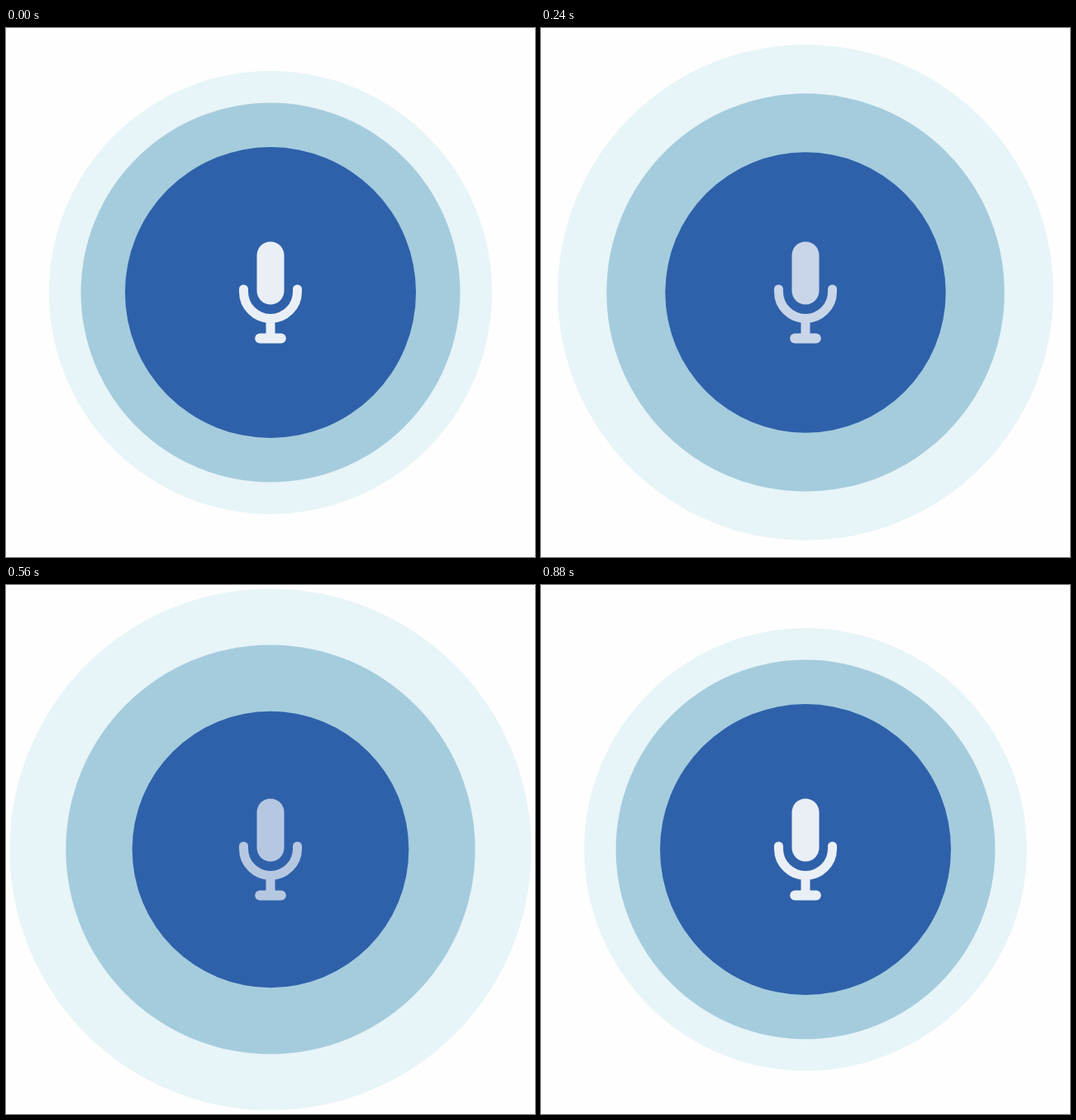
An HTML page for the animation above (960 ms loop, 640 by 640 pixels).

```html
<!DOCTYPE html>
<html lang="en">
<head>
<meta charset="utf-8">
<title>Voice input pulse</title>
<style>
  html, body { margin: 0; width: 100%; height: 100%; overflow: hidden; background: #fefefe; }
  svg { display: block; width: 640px; height: 640px; animation: pulse .96s step-end infinite; }
  .halo { fill: #e7f4f8; r: var(--halo); }
  .ring { fill: #a5ccdd; r: var(--ring); }
  .disc { fill: #2e61aa; r: var(--disc); }
  .mic { fill: #fff; opacity: var(--ink); }
  .cradle { fill: none; stroke: #fff; stroke-width: 11; stroke-linecap: round; }

  /* quick swell, long hold, quick release, held in 80 ms ticks */
  @keyframes pulse {
    0%       { --halo: 268px;   --ring: 229.4px; --disc: 176px;   --ink: .9; }
    8.3333%  { --halo: 271px;   --ring: 230.2px; --disc: 175.2px; --ink: .885; }
    16.6667% { --halo: 280.7px; --ring: 233.2px; --disc: 173px;   --ink: .835; }
    25%      { --halo: 299.8px; --ring: 240.7px; --disc: 169.7px; --ink: .74; }
    33.3333% { --halo: 309.5px; --ring: 244.8px; --disc: 168.2px; --ink: .685; }
    41.6667% { --halo: 314.2px; --ring: 247px;   --disc: 167.4px; --ink: .66; }
    50%      { --halo: 316px;   --ring: 247.8px; --disc: 167.2px; --ink: .65; }
    58.3333% { --halo: 315.6px; --ring: 247.6px; --disc: 167.3px; --ink: .65; }
    66.6667% { --halo: 312.5px; --ring: 246.2px; --disc: 167.8px; --ink: .67; }
    75%      { --halo: 305.7px; --ring: 243.2px; --disc: 168.8px; --ink: .71; }
    83.3333% { --halo: 289px;   --ring: 236.5px; --disc: 171.6px; --ink: .795; }
    91.6667%, 100% { --halo: 267.7px; --ring: 229.4px; --disc: 176px; --ink: .9; }
  }
</style>
</head>
<body>
<svg viewBox="0 0 640 640">
  <circle class="halo" cx="320" cy="320"/>
  <circle class="ring" cx="320" cy="320"/>
  <circle class="disc" cx="320" cy="320"/>
  <g class="mic">
    <rect x="303.5" y="258.5" width="33" height="76" rx="16.5"/>
    <path class="cradle" d="M287.5 316v3a32.5 32.5 0 0 0 65 0v-3"/>
    <rect x="314.5" y="352" width="11" height="22"/>
    <rect x="301.2" y="369.5" width="37.6" height="12" rx="6"/>
  </g>
</svg>
</body>
</html>
```
